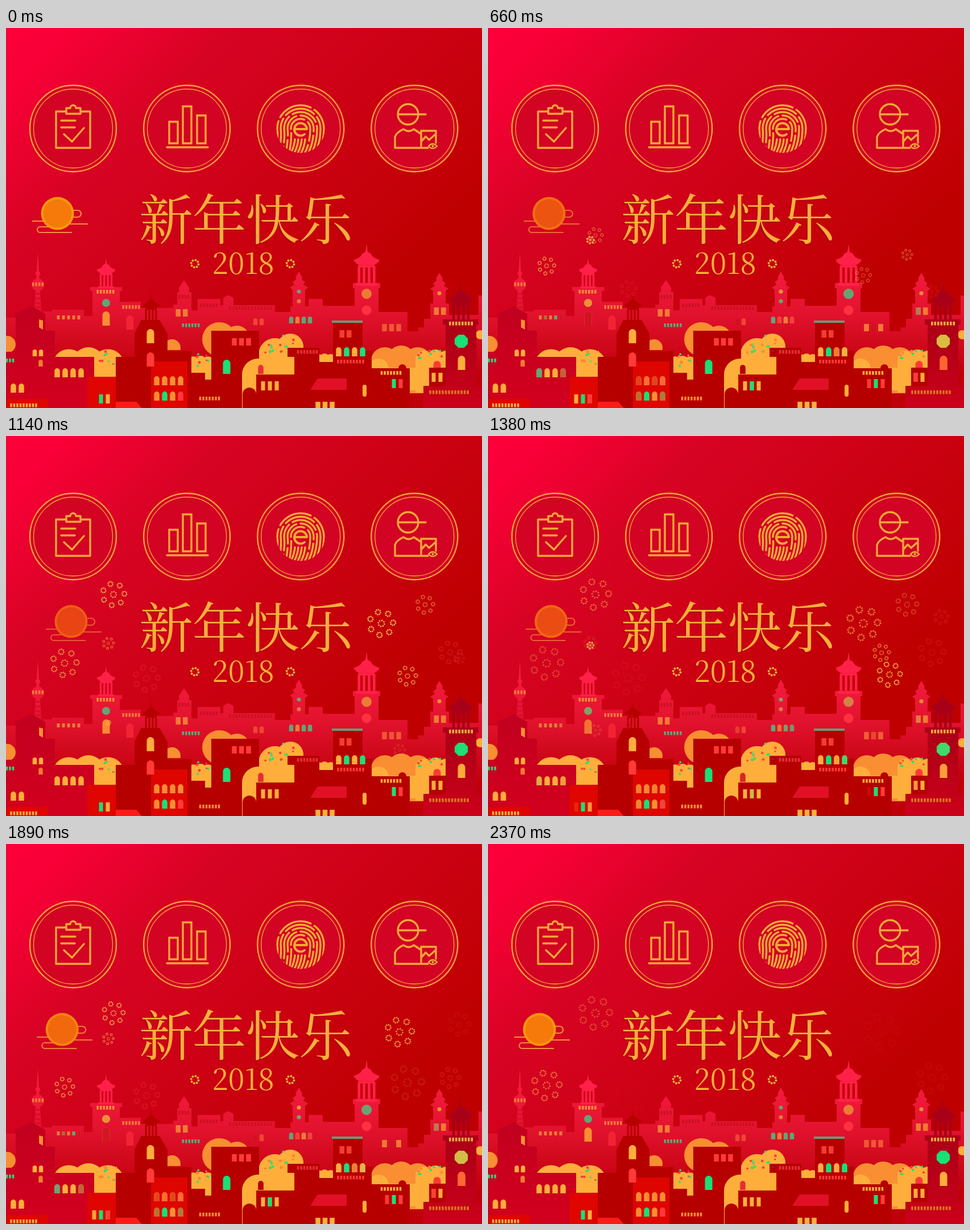
Animation of 837 by 669 pixels, one loop 2400 ms. Source, as an HTML page with a canvas:

```html
<!DOCTYPE html>
<html lang="zh">
<meta charset="utf-8">
<title>新年快乐</title>
<style>
html, body { margin: 0; width: 100%; height: 100%; overflow: hidden; background: #c80012 }
canvas { display: block }
</style>
<canvas id="stage" width="837" height="669"></canvas>
<script>
const ctx = document.getElementById('stage').getContext('2d');
const LOOP = 2400, TAU = Math.PI * 2;
const GOLD = '#ffae3b', ORANGE = '#f98e32', AMBER = '#f07a35', LINE = '#f9a838';
const GREEN = '#16e276', SAGE = '#62a477', RED = '#ff3a38', DIM = '#cf0f22', ROSE = '#e82e38';
const DARK = '#b60000', BRIGHT = '#df0500';
const clamp = v => Math.max(0, Math.min(1, v));
let light = 0;

function gradient(x0, y0, x1, y1, ...stops) {
  const g = ctx.createLinearGradient(x0, y0, x1, y1);
  stops.forEach(([at, color]) => g.addColorStop(at, color));
  return g;
}
const sky = gradient(0, 0, 600, 600, [0, '#fc003a'], [.1, '#f80037'], [.33, '#d70323'], [.65, '#cb0112'], [.95, '#be0000']);
const haze = gradient(0, 385, 0, 610, [0, '#ff2047'], [.5, '#e3132f'], [1, '#bf000a']);
const wine = gradient(0, 490, 0, 669, [0, '#c2001f'], [1, '#d2001e']);
const plum = gradient(0, 450, 0, 669, [0, '#a80018'], [.45, '#b00016'], [1, '#cc001a']);

function rect(color, x, y, w, h) { ctx.fillStyle = color; ctx.fillRect(x, y, w, h); }
function shape(color, d) { ctx.fillStyle = color; ctx.fill(new Path2D(d)); }
function stroke(d, width = 3.4, color = LINE) {
  ctx.strokeStyle = color; ctx.lineWidth = width; ctx.stroke(new Path2D(d));
}
function disc(color, x, y, r) {
  ctx.fillStyle = color; ctx.beginPath(); ctx.arc(x, y, r, 0, TAU); ctx.fill();
}
function circle(x, y, r, width = 3.4) {
  ctx.strokeStyle = LINE; ctx.lineWidth = width;
  ctx.beginPath(); ctx.arc(x, y, r, 0, TAU); ctx.stroke();
}
// A paint is a colour, or a pair that cross-fades with the light level
function paint(colors, draw) {
  const [a, b] = [].concat(colors);
  draw(a);
  if (b) { ctx.globalAlpha = light; draw(b); ctx.globalAlpha = 1; }
}
const WINDOWS = {
  slit: { w: 3.5, h: 6.5, step: 5.5 },
  pane: { w: 5, h: 7, step: 9 },
  box: { w: 8.5, h: 13, step: 12.5 },
  tall: { w: 7, h: 16, step: 12 },
  niche: { w: 7.5, h: 12, step: 11, arched: true },
  arch: { w: 9.5, h: 16, step: 14, arched: true },
  door: { w: 13, h: 25, step: 20, arched: true }
};
// A centred row of n windows, with the paints repeating along it
function row(kind, cx, y, n, ...paints) {
  const { w, h, step, arched } = WINDOWS[kind];
  for (let i = 0; i < n; i++) paint(paints[i % paints.length], color => {
    ctx.fillStyle = color;
    ctx.beginPath();
    ctx.roundRect(cx - w / 2 + (i - (n - 1) / 2) * step, y, w, h, arched ? [w / 2, w / 2, 0, 0] : 0);
    ctx.fill();
  });
}

function fingerprint(x, y) {
  ctx.save();
  ctx.beginPath();
  ctx.arc(x, y, 43, 0, TAU);
  ctx.clip();
  for (let i = 0; i < 5; i++) {
    const r = 17 + i * 6;
    ctx.setLineDash([34 + i * 7, 7.5]);
    ctx.lineDashOffset = i * 19;
    stroke(`M${x - r - 3} ${y + 42}Q${x - r + 2} ${y + 18} ${x - r} ${y}A${r} ${r} 0 0 1 ${x + r} ${y}Q${x + r} ${y + 24} ${x + r - 9} ${y + 42}`);
  }
  ctx.setLineDash([]);
  for (let dx = -10; dx < 14; dx += 6) stroke(`M${x + dx} ${y + 19}Q${x + dx - 1} ${y + 31} ${x + dx - 7} ${y + 43}`);
  ctx.restore();
  stroke(`M${x - 10} ${y + 1}H${x + 11}A11 11 0 1 0 ${x + 7} ${y + 10}`, 4);
}

function icons() {
  for (let i = 0; i < 4; i++) {
    const x = 118 + i * 200.1;
    disc('#d20323', x, 177, 76);
    circle(x, 177, 76, 2.4);
    circle(x, 177, 69.5, 1.3);
  }
  ctx.lineCap = ctx.lineJoin = 'round';
  stroke('M105 147H88V211H148V147H132M106 141H113A5 5 0 0 1 123 141H131V151H106ZM97 163H122M97 175H121M102 187L116 200L137 176');
  ctx.lineJoin = 'miter';
  stroke('M287 165H302V203H287ZM311 138H326V203H311ZM336 154H351V203H336ZM283 210H355');
  ctx.lineJoin = 'round';
  fingerprint(518, 177);
  circle(707, 152, 18);
  stroke('M690 152H738M742 211H684V192Q686 184 699 178Q708 185 717 178L729 186M730 203V181H756V202M730 211V200L738 191L744 197L754 188');
  stroke('M743 208Q750 200 758 208Q750 216 743 208Z', 2.4);
  disc(LINE, 750.5, 208, 2);
}

function ring(color, x, y, r, dot) {
  for (let a = .2; a < TAU; a += TAU / 8) disc(color, x + r * Math.cos(a), y + r * Math.sin(a), dot);
}
function greeting() {
  ctx.textAlign = 'center';
  for (const [color, shift] of [['#ae0010', 2], [GOLD, 0]]) {
    ctx.fillStyle = color;
    ctx.font = '500 95px "Noto Serif CJK SC", "Noto Serif SC", "Noto Sans CJK SC", serif';
    [...'新年快乐'].forEach((c, i) => ctx.fillText(c, 281.5 + i * 93.6 - shift, 373 + shift));
    ctx.font = ctx.font.replace('95px', '51px');
    ctx.fillText('2018', 417 - shift / 2, 433 + shift / 2);
    for (const x of [332, 500]) ring(color, x - shift / 2, 415 + shift / 2, 6.5, 2);
  }
}

function sun(t) {
  const ease = p => (1 - Math.cos(Math.PI * clamp(p))) / 2;
  const back = clamp((t - 1140) / 1200);
  const k = t < 1140 ? ease(t / 1050) : 1 - (back + ease(back)) / 2;
  ctx.save();
  ctx.translate(24 * k, 0);
  ctx.globalAlpha = 1 - .4 * k;
  ctx.lineCap = 'butt';
  stroke('M118 321H126A6 6 0 0 1 126 333H118M46 340H70M110 345H144M98 350H60A5 5 0 0 0 60 360H116', 2.2, '#f4913c');
  ctx.globalAlpha = 1;
  disc(`rgb(${255 - 17 * k},${152 - 58 * k},${14 + 6 * k})`, 90.5, 326.5, 29);
  disc(`rgb(${245 - 13 * k},${122 - 54 * k},${10 + 10 * k})`, 90.5, 326.5, 25);
  ctx.restore();
}

// Tower top: finial, curved roof, columns and sill
function lantern(color, x, top, s) {
  ctx.save();
  ctx.translate(x, top);
  ctx.scale(s, s);
  shape(color, 'M0 0L2 14Q8 16 9 20Q12 24 22 27Q20 33 12 36H-12Q-20 33 -22 27Q-12 24 -9 20Q-8 16 -2 14Z');
  rect(color, -14, 36, 28, 4);
  for (let i = 0; i < 4; i++) rect(color, -15 + i * 8.5, 38, 4.5, 28);
  rect(color, -18, 66, 36, 5);
  ctx.restore();
}
// Slim tower: tiers that widen downwards
function pagoda(x, top) {
  for (let i = 0; i < 3; i++) {
    const y = top + i * 9, w = 6 + i * 5;
    shape(haze, `M${x} ${y}L${x + w} ${y + 10}L${x + w * .6} ${y + 15}V${y + 20}H${x - w * .6}V${y + 15}L${x - w} ${y + 10}Z`);
  }
  rect(haze, x - 11, top + 28, 22, 60);
}

function backCity() {
  shape(haze, `M0 669V510H45V499H81V496H137V507H152V463H148V456H204V463H200V482H237V493H294V487H301V465H304V457L313 444L322 457V465H326V497
    H337V477H377V488H382V475L390 470L400 475V488H473V500H500V490H532V477H557V489H613V458H610V449H658V458H655V500H706V534H725V527H735V512H746V485H779V505H831V471H837V669Z`);
  shape(haze, 'M56 395L58 430L62 500H50L54 430Z');
  disc(haze, 56, 432, 4);
  disc(haze, 56, 452, 11);
  lantern(haze, 176, 405, .75);
  lantern(haze, 634, 380, 1.04);
  pagoda(515, 429);
  pagoda(762, 431);

  for (let y = 467; y < 498; y += 8) rect('#cf0b2b', 52, y, 8, 2);
  row('slit', 56, 448, 4, AMBER);
  row('slit', 175, 461, 6, ORANGE);
  row('slit', 220, 488, 6, AMBER);
  row('slit', 313, 470, 4, DIM);
  row('slit', 357, 485, 6, DIM);
  row('slit', 430, 490, 14, DIM);
  row('slit', 325, 520, 6, SAGE);
  row('pane', 110, 506, 5, AMBER, [AMBER, '#ad6a40'], AMBER, [AMBER, SAGE], [AMBER, DIM]);
  row('door', 176, 499, 1, [ORANGE, DIM]);
  row('door', 218, 506, 1, '#f22434');
  row('box', 309, 495, 2, AMBER);
  row('niche', 444, 511, 2, ['#f04436', DIM], '#f04436');
  row('niche', 518, 508, 4, SAGE, [AMBER, RED], [SAGE, AMBER], [SAGE, RED]);
  row('box', 678, 521, 3, ['#ee5734', AMBER], ['#ee5734', DIM]);
  row('box', 763, 492, 2, [AMBER, '#b67a52'], AMBER);
  paint([SAGE, ORANGE], c => { disc(c, 176, 484, 7); disc(c, 515, 464, 3.5); });
  paint([AMBER, SAGE], c => { disc(c, 634, 468, 9); disc(c, 515, 481, 3.5); });
  disc('#ff3040', 634, 497, 8.5);
  disc(ORANGE, 762, 467, 3.5);
}

function bush(color, left, right, top) {
  const w = right - left, r = w / 4.4;
  for (let i = 0; i < 3; i++) disc(color, left + r + i * (w / 2 - r), top + r + Math.abs(i - 1) * r * .12, r);
  rect(color, left, top + r, w, 60);
}
function blossoms(x, y, w, h, n) {
  let seed = x;
  const random = () => (seed = seed * 16807 % 2147483647) / 2147483647;
  for (let i = 0; i < n; i++) {
    const px = x + w * random(), py = y + h * random(), r = 1.2 + random() * 1.3;
    paint(i % 2 ? GREEN : [RED, ORANGE], c => disc(c, px, py, r));
  }
}
function bushes() {
  disc(ORANGE, 2, 557, 15);
  disc(ORANGE, 292, 563, 15);
  disc(ORANGE, 375, 548, 30);
  disc(ORANGE, 406, 546, 22);
  bush(ORANGE, 642, 748, 559);
  bush(GOLD, 82, 208, 562);
  bush(GOLD, 318, 366, 577);
  bush(GOLD, 540, 580, 573);
  bush(GOLD, 720, 790, 566);
  disc(GOLD, 655, 600, 18);
  rect(GOLD, 640, 598, 120, 40);
  disc(GOLD, 834, 540, 8);
  disc(GOLD, 500, 561, 23);
  disc(GOLD, 473, 575, 29);
  rect(GOLD, 446, 573, 105, 50);
  blossoms(165, 569, 38, 24, 10);
  blossoms(336, 574, 20, 24, 7);
  blossoms(456, 540, 58, 32, 14);
  blossoms(725, 568, 42, 22, 10);
}

function leftHouses() {
  shape(wine, 'M0 669V570H17V503L45 490L69 503V533H86V579H155V669Z');
  shape(ORANGE, 'M58 513L65 515V531L58 527Z');
  lantern(DARK, 255, 468, .7);
  shape(DARK, 'M193 669V579H226V538L238 514H270L284 538V567H326V607H350V619H361V533H445V669Z');
  rect('#d20512', 284, 567, 42, 2);
  rect(BRIGHT, 143, 614, 50, 55);
  rect(BRIGHT, 255, 587, 64, 82);
  rect(wine, 0, 642, 143, 27);
  rect(BRIGHT, 0, 653, 74, 16);
  shape('#ff1a18', 'M193 658H229L239 669H193Z');

  row('slit', 7, 582, 3, GREEN);
  row('slit', 31, 661, 9, GOLD);
  row('slit', 358, 649, 7, ORANGE);
  row('niche', 56, 566, 2, GOLD);
  row('niche', 61, 584, 1, AMBER);
  row('arch', 20, 626, 2, GOLD);
  row('arch', 111, 599, 4, [GOLD, SAGE], GOLD, GOLD, [GOLD, '#c0603a']);
  row('tall', 167, 645, 3, [BRIGHT, GOLD], GREEN, [GOLD, RED]);
  row('door', 254, 530, 1, GOLD);
  row('door', 254, 571, 1, RED);
  row('arch', 286, 613, 4, [ORANGE, '#e0441d'], [ORANGE, '#ff6a30']);
  row('arch', 286, 640, 4, [ORANGE, '#b8702e'], GREEN, ORANGE, [RED, '#a8803a']);
  row('door', 388, 584, 1, GREEN);
  row('box', 414, 546, 3, RED);
}

function rightHouses() {
  disc(GOLD, 443, 610, 28);
  rect(GOLD, 415, 610, 80, 59);
  shape(DARK, `M416 669V645A12 12 0 0 1 440 645V610H507V579H495V563H551V588H575V519H627V568H643V599H690A7 7 0 0 1 704 599H710V669Z`);
  rect('#58a478', 573, 515, 54, 4);
  shape('#e11027', 'M548 617H599V637H535Z');
  row('arch', 448, 593, 1, [ROSE, DARK]);
  row('door', 758, 586, 1, RED);
  rect(DARK, 744, 598, 30, 40);
  lantern(plum, 800, 448, 1.02);
  rect(plum, 773, 520, 54, 149);
  rect(plum, 768, 513, 63, 9);
  rect(plum, 734, 630, 103, 39);
  paint([GREEN, '#dfba42'], c => {
    ctx.fillStyle = c;
    ctx.beginPath();
    for (let a = TAU / 16; a < TAU; a += TAU / 8) ctx.lineTo(800.5 + 12.5 * Math.cos(a), 551.5 + 12.5 * Math.sin(a));
    ctx.fill();
  });

  row('slit', 530, 567, 7, ROSE);
  row('slit', 606, 584, 9, RED);
  row('slit', 677, 604, 7, GOLD);
  row('slit', 722, 628, 3, GOLD);
  row('slit', 800, 517, 8, GOLD);
  row('slit', 779, 638, 13, '#dc751f');
  row('box', 597, 532, 2, '#f23d31');
  row('arch', 606, 562, 4, GOLD, GREEN, [GOLD, AMBER], [GREEN, GOLD]);
  row('tall', 464, 622, 3, GOLD, [GOLD, GREEN], GOLD);
  row('tall', 682, 618, 3, [DARK, RED], GREEN, RED);
  row('tall', 758, 607, 2, [GOLD, RED], GOLD);
  row('door', 801, 577, 1, [GOLD, '#ff6232']);
  row('box', 561, 658, 3, GOLD);
  ctx.fillStyle = GOLD;
  ctx.beginPath();
  ctx.roundRect(627, 628, 7, 21, 3.5);
  ctx.fill();
}

// A shell rises from the ground, opens as it ages and fades away
function shell(age, x, peak, size, color) {
  if (age < 0 || age > 1350) return;
  const y = peak + (650 - peak) * (1 - clamp(age / 550)) ** 2;
  const r = size * Math.min(1, .28 + .65 * age / 1000);
  const dot = Math.max(.8, r * .052);
  ctx.globalAlpha = clamp(age / 380) * clamp((1350 - age) / 650) * (color === ROSE ? .6 : 1);
  ring(color, x, y, r * .2, dot);
  for (let i = 0; i < 7; i++) {
    const a = i * TAU / 7 - .96;
    ring(color, x + r * .77 * Math.cos(a), y + r * .77 * Math.sin(a), r * .165, dot);
  }
  ctx.globalAlpha = 1;
}
function volley(t, start, gap, ...shells) {
  shells.forEach(([x, peak, size = 32, color = '#f5b452'], i) => shell(t - start - i * gap, x, peak, size, color));
}
function fireworks(t) {
  volley(t, 205, 57, [180, 365, 13], [103, 400], [247, 427, 32, ROSE], [189, 279]);
  volley(t, 407, 10, [737, 297, 24, '#f08a48'], [781, 381, 29, ROSE], [660, 330, 36]);
  volley(t, 650, 200, [706, 420], [797, 318, 23, ROSE], [692, 331, 34], [781, 412, 29, ROSE]);
  volley(t, 990, 138, [180, 343, 13], [247, 443, 32, ROSE], [189, 298], [103, 425]);
}

function frame(now) {
  const t = now % LOOP;
  light = .5 - .5 * Math.cos(t / 1200 * TAU);
  rect(sky, 0, 0, 837, 669);
  icons();
  sun(t);
  greeting();
  backCity();
  bushes();
  leftHouses();
  rightHouses();
  fireworks(t);
  requestAnimationFrame(frame);
}
requestAnimationFrame(frame);
</script>
</html>
```
